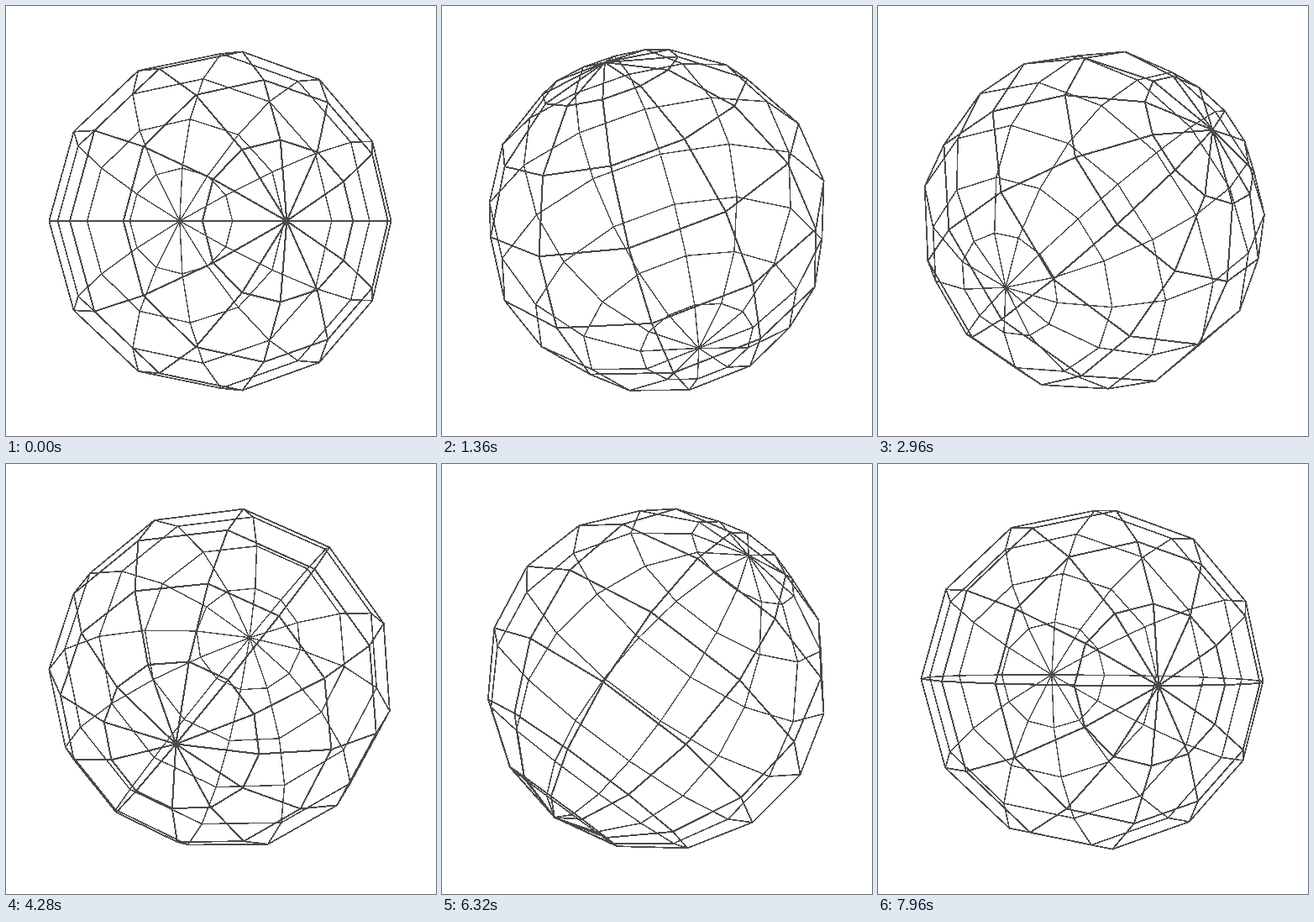
Write an HTML page that moves like this. It is 512 px wide and 512 px high and loops after 8 s.

```html
<!DOCTYPE html>
<html lang="en">
<head>
<meta charset="utf-8">
<title>Tumbling wire sphere</title>
<style>
  html, body { margin: 0; width: 100%; height: 100%; overflow: hidden; background: #fff; }
  svg { display: block; width: 512px; height: 512px; }
  line { stroke: #4a4a4a; stroke-linecap: round; shape-rendering: crispEdges; }
</style>
</head>
<body>
<svg id="stage" viewBox="0 0 512 512"></svg>
<script>
const stage = document.getElementById('stage');
const LOOP = 8000, STEP = 40, TAU = Math.PI * 2;
const SEGMENTS = 12, RINGS = 8;
const FOCAL = 831, DISTANCE = 4.172, CENTRE = 256;
const TILT = 17.65 * Math.PI / 180;
const WIRE = 6.8;

const turn = (a, b, angle) => {
  const c = Math.cos(angle), s = Math.sin(angle);
  return [a * c - b * s, a * s + b * c];
};
const smoothstep = u => u * u * (3 - 2 * u);

function spherePoint(ring, segment) {
  const polar = Math.PI * ring / RINGS, around = TAU * segment / SEGMENTS;
  return [Math.sin(polar) * Math.cos(around), Math.sin(polar) * Math.sin(around), Math.cos(polar)];
}

// Steady tumble, fixed tilt, then an eased roll about the view axis.
function project(point, u) {
  let [x, y, z] = point;
  [y, z] = turn(y, z, -TAU * u);
  [z, x] = turn(z, x, TILT);
  [x, y] = turn(x, y, TAU * smoothstep(u));
  const depth = DISTANCE - z, scale = FOCAL / depth;
  return { x: CENTRE + x * scale, y: CENTRE - y * scale, depth };
}

const points = [], edges = [];

function addEdge(from, to) {
  const line = document.createElementNS('http://www.w3.org/2000/svg', 'line');
  stage.append(line);
  edges.push({ line, from, to });
}

for (let r = 0; r <= RINGS; r++) {
  for (let s = 0; s < SEGMENTS; s++) {
    const here = r * SEGMENTS + s;
    points.push(spherePoint(r, s));
    if (r < RINGS) addEdge(here, here + SEGMENTS);
    if (r > 0 && r < RINGS) addEdge(here, r * SEGMENTS + (s + 1) % SEGMENTS);
  }
}

function draw(u) {
  const seen = points.map(p => project(p, u));
  for (const { line, from, to } of edges) {
    const a = seen[from], b = seen[to];
    line.setAttribute('x1', a.x);
    line.setAttribute('y1', a.y);
    line.setAttribute('x2', b.x);
    line.setAttribute('y2', b.y);
    line.setAttribute('stroke-width', WIRE * 2 / (a.depth + b.depth));
  }
}

const start = performance.now();
function tick() {
  const time = (performance.now() - start) % LOOP;
  draw(Math.floor(time / STEP) * STEP / LOOP);
  requestAnimationFrame(tick);
}
tick();
</script>
</body>
</html>
```
